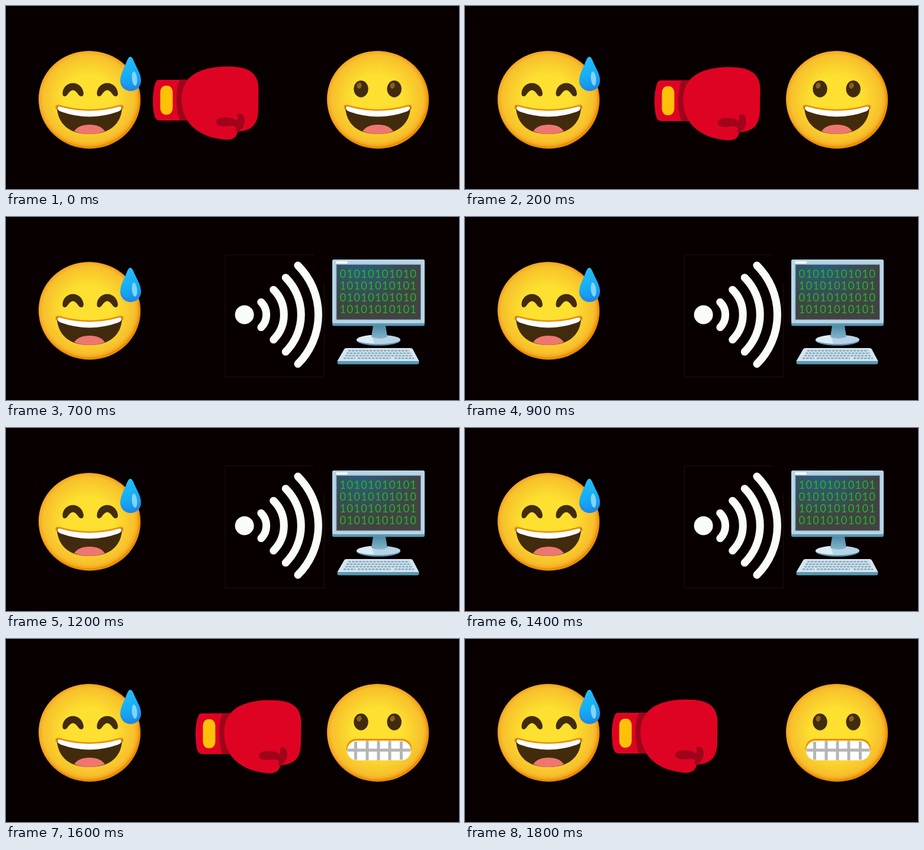
An HTML page for the animation above (1900 ms loop, 765 by 310 pixels).

```html
<!DOCTYPE html>
<html lang="en">
<head>
<meta charset="utf-8">
<title>Punch and signal</title>
<style>
  html, body { margin: 0; width: 100%; height: 100%; overflow: hidden; background: #080000; }
  svg { display: block; width: 765px; height: 310px; }
  .bits text { font: 400 18.5px Lato, sans-serif; letter-spacing: 1.15px; fill: #20b62c; }
  .arc { fill: none; stroke: #fafcf7; stroke-width: 13; stroke-linecap: round; }
  .brown { fill: #422b0d; }
  .glove-dark { fill: #a0041a; }
</style>
</head>
<body>
<svg viewBox="0 0 765 310">
  <defs>
    <radialGradient id="skin">
      <stop offset=".5" stop-color="#fde030"/>
      <stop offset=".92" stop-color="#f7c02b"/>
      <stop offset="1" stop-color="#f4a223"/>
    </radialGradient>
    <linearGradient id="water" x1=".3" y1="0" x2=".5" y2="1">
      <stop offset="0" stop-color="#29bdfa"/>
      <stop offset=".55" stop-color="#14adf5"/>
      <stop offset="1" stop-color="#1e8be8"/>
    </linearGradient>
    <radialGradient id="glass" cx=".3" cy=".08" r=".7">
      <stop offset="0" stop-color="#2c5c78"/>
      <stop offset="1" stop-color="#424242"/>
    </radialGradient>
    <linearGradient id="neck" x2="0" y2="1">
      <stop offset="0" stop-color="#4f8ba6"/>
      <stop offset="1" stop-color="#82b5cd"/>
    </linearGradient>
    <g id="head">
      <ellipse cx="141.200" cy="159" rx="86" ry="82.700" fill="#eb8f00"/>
      <ellipse cx="139.700" cy="157" rx="84.500" ry="80.700" fill="url(#skin)"/>
    </g>
    <g id="grin">
      <path d="M85 173Q84 167.500 90 169Q141 184 192 169Q198 167.500 197 173" fill="none" stroke="#eb8f00" stroke-width="3" stroke-linecap="round"/>
      <path class="brown" d="M86 172Q85 169 90 170.500Q141 185 192 170.500Q197 169 196 173C194 201 174 217 141 217S88 201 86 172Z"/>
      <path d="M86.500 172Q87 169.500 91 170.500Q141 184.500 191 170.500Q195 169.500 195.500 172Q195 177 189 179Q141 196 93 179Q87 177 86.500 172Z" fill="#fff"/>
      <path d="M115 212Q123 201 141 201T167 212Q155 217 141 217T115 212Z" fill="#ed7770"/>
    </g>
    <path id="wink" class="brown" d="M95.500 148C96 137 104 130.500 113 130.500S130 137 131 148Q131 153 127 153Q124 153 121.500 149Q117 142.500 113 142.500T104.500 149Q102 153 99 153Q95.500 153 95.500 148Z"/>
    <g id="eye">
      <ellipse class="brown" rx="12.200" ry="14.200"/>
      <ellipse cx="-3" cy="-5.500" rx="4" ry="5" fill="#896024" transform="rotate(20 -3 -5.500)"/>
    </g>
  </defs>

  <rect width="765" height="310" fill="#080000"/>

  <use href="#head"/>
  <use href="#wink"/>
  <use href="#wink" x="58"/>
  <use href="#grin"/>
  <path d="M210 86C213 86 215 91 217 96C222 107 228 116 228 126C228 137 220 144 210.500 144S193 137 193 126C193 116 199 106 203 96C205 91 207 86 210 86Z" fill="url(#water)"/>
  <path d="M193 125C198 138 212 141 220 135C225 131 227 126 227.500 121Q229 133 223 139C212 148 193 144 193 125Z" fill="#1e88e5" opacity=".5"/>
  <ellipse cx="217" cy="123" rx="4.400" ry="12" fill="#81d4fa" transform="rotate(-6 217 123)"/>

  <g id="friend">
    <use href="#head" x="487"/>
    <use href="#eye" x="599.500" y="140.500"/>
    <use href="#eye" x="655.700" y="140.500"/>
    <use href="#grin" x="487" id="happy"/>
    <g id="grimace">
      <path d="M576 188Q577 170.500 593 170.500H667Q683 170.500 684 188" fill="none" stroke="#eb8f00" stroke-width="3"/>
      <rect x="576" y="172.500" width="108" height="33" rx="16.500" fill="#fff"/>
      <path d="M576.500 188.300H683.500M590.500 174V204.500M610 172.500V205.500M629 172.500V205.500M648 172.500V205.500M667.500 173.500V204.500" stroke="#b5b5b5" stroke-width="5"/>
    </g>
  </g>

  <g id="glove">
    <path d="M258 125H300V194H260Q253 194 251 187Q248 177 248 160T252 131Q254 125 258 125Z" fill="#df0323" stroke="#000" stroke-width="5" paint-order="stroke"/>
    <path class="glove-dark" d="M294 124.500H309V194H294Q288 182 288 159T294 124.500Z"/>
    <path d="M296.500 158C297 132 309 116 334 108C352 102 380 101 397 104.500C419 109 426.500 123 426.500 140L426 174C426 200 416 211 391 213C389 225 380 228 366 226C332 222 297 204 296.500 158Z" fill="#df0323"/>
    <rect x="260.500" y="135" width="21" height="49" rx="9" ry="11" fill="#ffc107"/>
    <path class="glove-dark" d="M355 197C355 190 364 188.500 373 188.500Q384 189 390 194Q392 189 390.500 185.500C392 181 398 181 401 186C406 196 401 208 393 212.500L387 212Q390 207 387 204Q380 202 370 204Q355 204 355 197Z"/>
  </g>

  <g id="tech">
    <path d="M520 64H370.500V271H537.500V112" fill="none" stroke="#11100a" stroke-width="1.500"/>
    <circle cx="402.700" cy="165.500" r="16" fill="#fafcf7"/>
    <g id="waves"></g>

    <rect x="551" y="72" width="156" height="112.500" rx="3" fill="#5b98b2"/>
    <rect x="551" y="72" width="156" height="108" rx="3" fill="#b9d4e6"/>
    <rect x="557" y="75" width="20" height="4" rx="2" fill="#fff"/>
    <rect x="557" y="79.500" width="144" height="95" fill="#82aec2"/>
    <rect x="558.500" y="81" width="141.500" height="92.500" fill="url(#glass)"/>
    <g id="bitsA" class="bits"></g>
    <g id="bitsB" class="bits"></g>

    <ellipse cx="629" cy="209" rx="37" ry="8.800" fill="#5b98b2"/>
    <ellipse cx="629" cy="207.500" rx="37" ry="7.800" fill="#b9d4e6"/>
    <path d="M592 209Q595 202 617 200L622 214Q600 214 592 209Z" fill="#dcecf5"/>
    <path d="M620 184H641L644 203Q631 209 617 203Z" fill="url(#neck)"/>

    <path d="M560 243H697.500V247Q697 249.500 694 249.500H563Q560 249.500 559.500 247Z" fill="#5b98b2"/>
    <path d="M575 222H683Q686 222 687 224L697.500 244H559.500L571 224Q572 222 575 222Z" fill="#d5e5ee"/>
    <g fill="none" stroke="#86abc0" stroke-width="2.500" stroke-dasharray="4.500 1.500">
      <path d="M578 226.500H681"/>
      <path d="M575 230.800H684"/>
      <path d="M573 235H686"/>
      <path d="M570 239.300H590M594 239.300H650M656 239.300H689"/>
    </g>
  </g>
</svg>

<script>
  const LOOP = 1900;
  const $ = id => document.getElementById(id);

  // Quarter arcs on a shared centre, each opening to the right.
  $("waves").innerHTML = [30.2, 59.8, 88.8, 118].map(r => {
    const d = r * Math.SQRT1_2, x = 409.5 + d;
    return `<path class="arc" d="M${x} ${165.5 - d}A${r} ${r} 0 0 1 ${x} ${165.5 + d}"/>`;
  }).join("");

  function fillBits(id, first) {
    $(id).innerHTML = [0, 1, 2, 3].map(row => {
      const line = Array.from({ length: 11 }, (_, i) => (first + row + i) % 2).join("");
      return `<text x="563.5" y="${102.5 + row * 20}">${line}</text>`;
    }).join("");
  }
  fillBits("bitsA", 0);
  fillBits("bitsB", 1);

  // Each step is [time in ms, value], held until the next one.
  function play(id, prop, steps) {
    const frames = steps.map(([t, v]) => ({ offset: t / LOOP, [prop]: v, easing: "step-end" }));
    frames.push({ offset: 1, [prop]: steps[steps.length - 1][1] });
    $(id).animate(frames, { duration: LOOP, iterations: Infinity });
  }

  const at = (x, y) => `translate(${x}px, ${y}px)`;
  const spots = [at(0, 0), at(36, 0.5), at(72, 1), at(110, 3)];
  const blink = first => Array.from({ length: 19 }, (_, i) => [i * 100, (i + first) % 2]);
  const punch = [[0, 1], [700, 0], [1500, 1]];

  play("glove", "transform", [
    ...spots.map((s, i) => [i * 100, s]),
    ...[...spots].reverse().map((s, i) => [1500 + i * 100, s])
  ]);
  play("glove", "opacity", punch);
  play("friend", "opacity", punch);
  play("happy", "opacity", [[0, 1], [400, 0]]);
  play("grimace", "opacity", [[0, 0], [400, 1]]);
  play("tech", "opacity", [[0, 0], [700, 1], [1500, 0]]);
  play("bitsA", "opacity", blink(0));
  play("bitsB", "opacity", blink(1));
</script>
</body>
</html>
```
